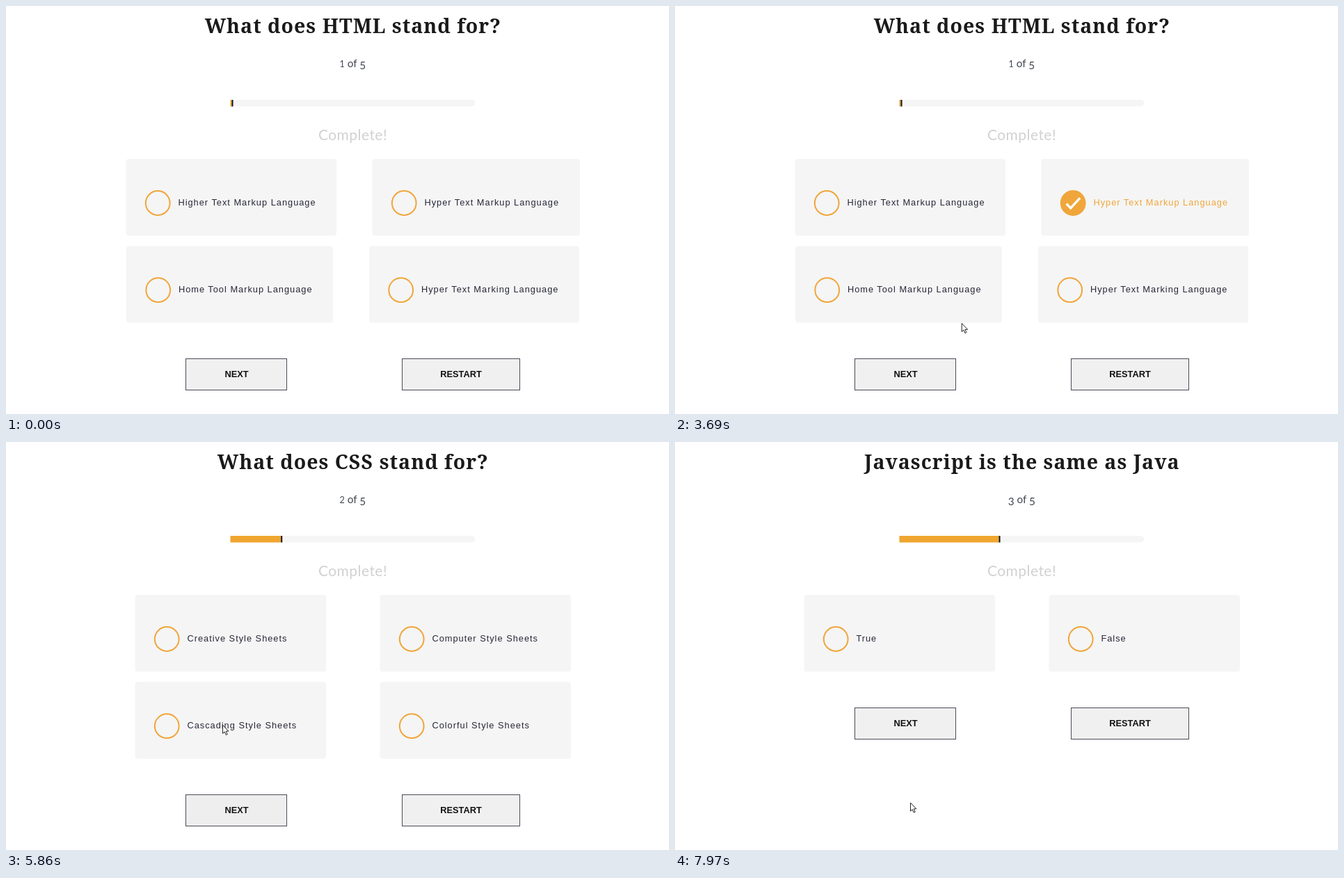
An HTML page that plays this animation: 953 by 587 pixels, repeating every 8 s.

```html
<!DOCTYPE html>
<html lang="en">
<head>
<meta charset="utf-8">
<title>Quiz</title>
<style>
  html, body { margin: 0; width: 100%; height: 100%; overflow: hidden; background: #fff; }
  svg { display: block; }
  text { fill: #272838; }
  .title { font: bold 28.5px "Noto Serif", serif; letter-spacing: 1px; fill: #1a1a1a; text-anchor: middle; }
  .count { font: 15.3px Lato, sans-serif; fill: #41464f; text-anchor: middle; }
  .done { font: 21px Lato, sans-serif; letter-spacing: .45px; fill: #d0d1d0; text-anchor: middle; }
  .label { font: 12.8px "Liberation Sans", Arial, sans-serif; letter-spacing: 1px; }
  .button text { font: bold 12.8px "Liberation Sans", Arial, sans-serif; text-anchor: middle; fill: #111; }
  .button rect { fill: #f0f0f0; stroke: #4a4b58; }
  .card { fill: #f5f5f5; }
  .ring { fill: none; stroke: #f0a63a; stroke-width: 2; }
  .tick { fill: none; stroke: #fff; stroke-width: 3.4; }
  .checked .ring { fill: #f0a63a; }
  .checked .label { fill: #f0a63a; }
  .option:not(.checked) .tick { display: none; }
</style>
</head>
<body>
<svg width="953" height="587" viewBox="0 0 953 587">
  <path d="M322.5 135H669.5a4.75 4.75 0 0 1 0 9.5H322.5Z" fill="#f5f5f5"/>
  <rect id="fill" x="322.5" y="135" height="9.5" fill="#f0a52f"/>
  <rect id="edge" y="135" width="2" height="9.5" fill="#111"/>
  <text class="done" x="498.5" y="193">Complete!</text>
  <g id="pages"></g>
  <g id="buttons" class="button">
    <rect id="next" x="258.5" y="507.5" width="145" height="45"/>
    <text id="nextText" x="331.5" y="534">NEXT</text>
    <rect x="569.5" y="507.5" width="169" height="45"/>
    <text x="654" y="534">RESTART</text>
  </g>
  <g id="cursor">
    <circle id="press" r="11" fill="#fff000" fill-opacity=".55"/>
    <path d="M.5 .5V12.6L3.2 10.1L5.2 14.6L7.2 13.7L5.2 9.3H8.9Z" fill="#fff" stroke="#222" stroke-width="1"/>
  </g>
</svg>
<script>
const LOOP = 8000;
const BAR_X = 322.5;
const $ = id => document.getElementById(id);

// Options are [card x, card width, label], two to a row.
const pages = [
  { title: 'What does HTML stand for?', start: 0, fill: 2, options: [
    [172.5, 302.5, 'Higher Text Markup Language'], [526.5, 298.5, 'Hyper Text Markup Language'],
    [173, 297, 'Home Tool Markup Language'], [522, 302, 'Hyper Text Marking Language']] },
  { title: 'What does CSS stand for?', start: 4260, fill: 72.7, options: [
    [185.5, 274.5, 'Creative Style Sheets'], [537.5, 274.5, 'Computer Style Sheets'],
    [185.5, 274.5, 'Cascading Style Sheets'], [537.5, 274.5, 'Colorful Style Sheets']] },
  { title: 'Javascript is the same as Java', start: 7550, fill: 143, options: [
    [185.5, 274.5, 'True'], [537.5, 274.5, 'False']] }
];

const picks = [{ page: 0, option: 1, at: 3000 }, { page: 1, option: 2, at: 6090 }];
const presses = [[2930, 3000], [4150, 4260], [6020, 6090], [7480, 7550]];

// Button hover: [start, direction]
const hovers = [[3690, 1], [5580, -1], [6590, 1], [7600, -1]];

const linear = p => p;
const slowDown = p => 1 - (1 - p) ** 2;
const smooth = p => p * p * (3 - 2 * p);

// Pointer path: [time, x, y, easing towards this point]
const path = [
  [540, 917, 579], [660, 939, 575, slowDown], [1330, 939, 575],
  [1630, 494, 562, slowDown], [1990, 430, 485], [2130, 433, 446],
  [2330, 510, 345], [2560, 568.5, 272.5, slowDown], [3390, 568.5, 272.5],
  [3850, 352, 526, smooth], [5550, 352, 526],
  [5860, 311, 407, smooth], [5980, 313, 395, slowDown], [6260, 313, 395],
  [6740, 338, 528, smooth], [7600, 338, 528], [7940, 338, 518.5, smooth]
];

const clamp = p => Math.min(1, Math.max(0, p));
const mix = (a, b, p) => a + (b - a) * p;
const blend = (a, b, p) => `rgb(${a.map((v, i) => Math.round(mix(v, b[i], p)))})`;

// Old-style figures: 1 and 2 are small, the others hang below the line.
function counter(n) {
  const first = n < 3 ? `<tspan font-size="12.5">${n}</tspan>` : `<tspan dy="3">${n}</tspan>`;
  return `${first}<tspan dy="${n < 3 ? 0 : -3}"> of </tspan><tspan dy="3">5</tspan>`;
}

function option([x, w, label], i) {
  const down = 125.2 * (i >> 1), cx = x + 45.7;
  return `<g class="option">
    <rect class="card" x="${x}" y="${220 + down}" width="${w}" height="110.5" rx="4"/>
    <g transform="translate(${cx} ${283.5 + down})">
      <circle class="ring" r="17.4"/><path class="tick" d="M-9.5 1L-3.5 7.3L10 -7.3"/>
    </g>
    <text class="label" x="${cx + 29.2}" y="${287 + Math.floor(down)}">${label}</text></g>`;
}

$('pages').innerHTML = pages.map((p, i) => `<g>
  <text class="title" x="498.8" y="39">${p.title}</text>
  <text class="count" x="498.3" y="88">${counter(i + 1)}</text>
  ${p.options.map(option).join('')}</g>`).join('');
const groups = [...$('pages').children];

function pointer(t) {
  const i = path.findIndex(k => k[0] > t);
  if (i < 0) return path[path.length - 1].slice(1, 3);
  const [t0, x0, y0] = path[i - 1], [t1, x1, y1, ease = linear] = path[i];
  const p = ease((t - t0) / (t1 - t0));
  return [mix(x0, x1, p), mix(y0, y1, p)];
}

function draw(t) {
  const current = pages.findLastIndex(p => t >= p.start);
  groups.forEach((g, i) => g.style.display = i === current ? '' : 'none');
  for (const { page, option, at } of picks)
    groups[page].querySelectorAll('.option')[option].classList.toggle('checked', t >= at);

  const { start, fill } = pages[current];
  const from = current ? pages[current - 1].fill : fill;
  const width = mix(from, fill, smooth(clamp((t - start) / 110)));
  $('fill').setAttribute('width', width);
  $('edge').setAttribute('x', BAR_X + width);

  const hover = hovers.reduce((sum, [at, dir]) => sum + dir * smooth(clamp((t - at) / 300)), 0);
  $('next').style.fill = blend([240, 240, 240], [39, 40, 56], hover);
  $('nextText').style.fill = blend([17, 17, 17], [255, 255, 255], hover);
  $('next').style.stroke = blend([74, 75, 88], [39, 40, 56], hover);
  $('buttons').setAttribute('transform', `translate(0 ${current === 2 ? -125 : 0})`);

  const visible = t >= path[0][0];
  $('cursor').style.display = visible ? '' : 'none';
  if (visible) $('cursor').setAttribute('transform', `translate(${pointer(t)})`);
  $('press').style.display = presses.some(([a, b]) => t >= a && t < b) ? '' : 'none';
}

const begin = performance.now();
function tick() {
  draw((performance.now() - begin) % LOOP);
  requestAnimationFrame(tick);
}
tick();
</script>
</body>
</html>
```
